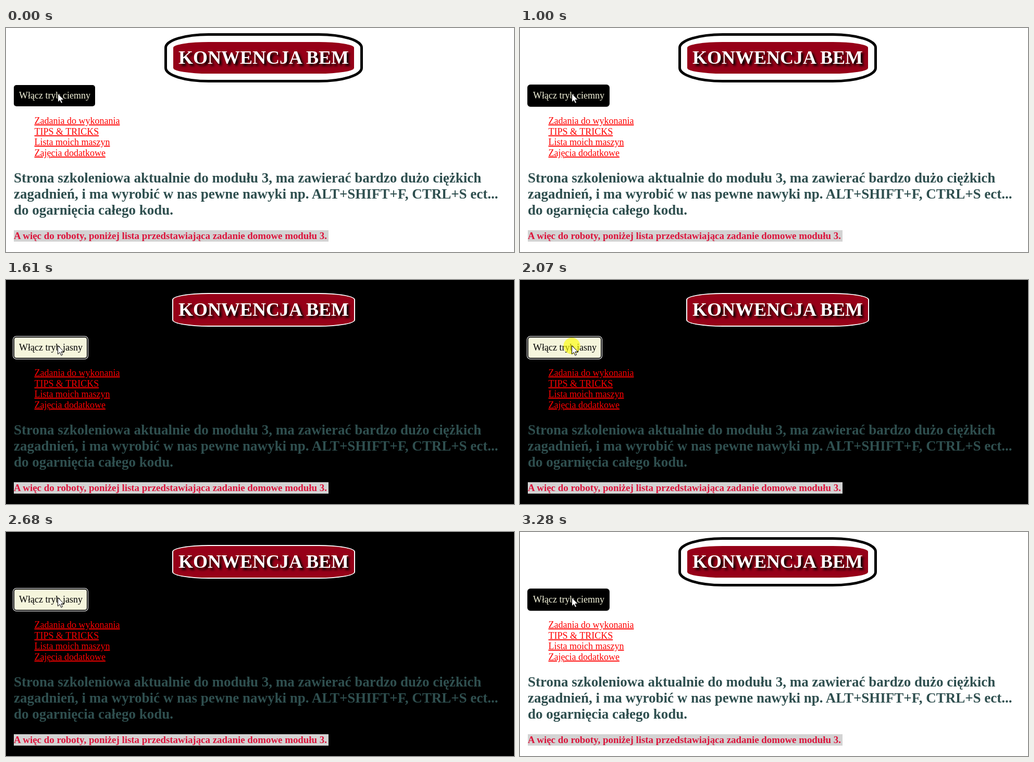
These frames come from a looping animation (975x432 px, 3.68 s). An HTML page:

```html
<!DOCTYPE html>
<html lang="pl">
<head>
<meta charset="utf-8">
<style>
  html, body { margin: 0; width: 100%; height: 100%; overflow: hidden; background: #fff; }
  svg { display: block; font: 18px "Liberation Serif", "Times New Roman", serif; }
  .title { font-size: 36px; font-weight: bold; fill: #fff; text-anchor: middle; filter: drop-shadow(4px 4px 2px #000); }
  .links { fill: #f00; text-decoration: underline; }
  .intro { font-size: 27px; font-weight: bold; fill: #2f4f4f; }
  .task { font-size: 18.9px; font-weight: bold; fill: crimson; }
  .page { fill: #fff; }
  .face { fill: #000; }
  .label { fill: beige; }
  .dark .page { fill: #000; }
  .dark .face { fill: beige; }
  .dark .label { fill: #000; }
  .ring { fill: none; stroke: #fff; stroke-width: 4; }
  .focus .face { stroke: #101010; stroke-width: 2; }
  svg:not(.focus) .ring, svg:not(.press) .halo { display: none; }
</style>
</head>
<body>
<svg id="stage" width="975" height="432" viewBox="0 0 975 432">
  <rect class="page" width="975" height="432"/>

  <rect x="306.5" y="12.5" width="376" height="90" rx="82.5" ry="25.5" fill="none" stroke="#000" stroke-width="5"/>
  <rect x="319" y="25" width="351" height="65" rx="70" ry="13" fill="#fff"/>
  <rect x="321" y="27" width="347" height="61" rx="68" ry="11" fill="#960018"/>
  <text class="title" x="494.5" y="69">KONWENCJA BEM</text>

  <rect class="ring button" x="15" y="110" height="41" rx="5"/>
  <rect class="face button" x="15" y="110" height="41" rx="5"/>
  <text class="label" id="label" x="25" y="136"></text>

  <g class="links">
    <text x="54.5" y="185">Zadania do wykonania</text>
    <text x="54.5" y="206">TIPS &amp; TRICKS</text>
    <text x="54.5" y="226">Lista moich maszyn</text>
    <text x="54.5" y="247">Zajęcia dodatkowe</text>
  </g>

  <g class="intro">
    <text x="15" y="298">Strona szkoleniowa aktualnie do modułu 3, ma zawierać bardzo dużo ciężkich</text>
    <text x="15" y="329">zagadnień, i ma wyrobić w nas pewne nawyki np. ALT+SHIFT+F, CTRL+S ect...</text>
    <text x="15" y="360">do ogarnięcia całego kodu.</text>
  </g>

  <rect x="15" y="390" width="604" height="22" fill="lightgray"/>
  <text class="task" x="15" y="407">A więc do roboty, poniżej lista przedstawiająca zadanie domowe modułu 3.</text>

  <circle class="halo" cx="99.5" cy="127" r="16" fill="#ff0" fill-opacity=".62"/>
  <path d="M99.5 126.500v16.500l3.800-3.500l2.500 5.800l2.700-1.100l-2.500-5.700h5.200z" fill="#fff" stroke="#000"/>
</svg>
<script>
  const LOOP = 3680;
  // Each click: press, release and theme switch times
  const clicks = [
    [410, 480, 480], [930, 1000, 1000], [1470, 1540, 1610],
    [2070, 2150, 2150], [2610, 2680, 2680], [3210, 3280, 3280]
  ];
  const stage = document.getElementById('stage');
  const label = document.getElementById('label');
  const buttons = stage.querySelectorAll('.button');

  function draw(t) {
    const dark = clicks.filter(c => t >= c[2]).length % 2 === 1;
    stage.classList.toggle('dark', dark);
    stage.classList.toggle('focus', t >= clicks[0][0]);
    stage.classList.toggle('press', clicks.some(c => t >= c[0] && t < c[1]));
    label.textContent = 'Włącz tryb ' + (dark ? 'jasny' : 'ciemny');
    buttons.forEach(b => b.setAttribute('width', dark ? 141 : 156));
  }

  const start = performance.now();
  function tick() {
    draw((performance.now() - start) % LOOP);
    requestAnimationFrame(tick);
  }
  tick();
</script>
</body>
</html>
```
